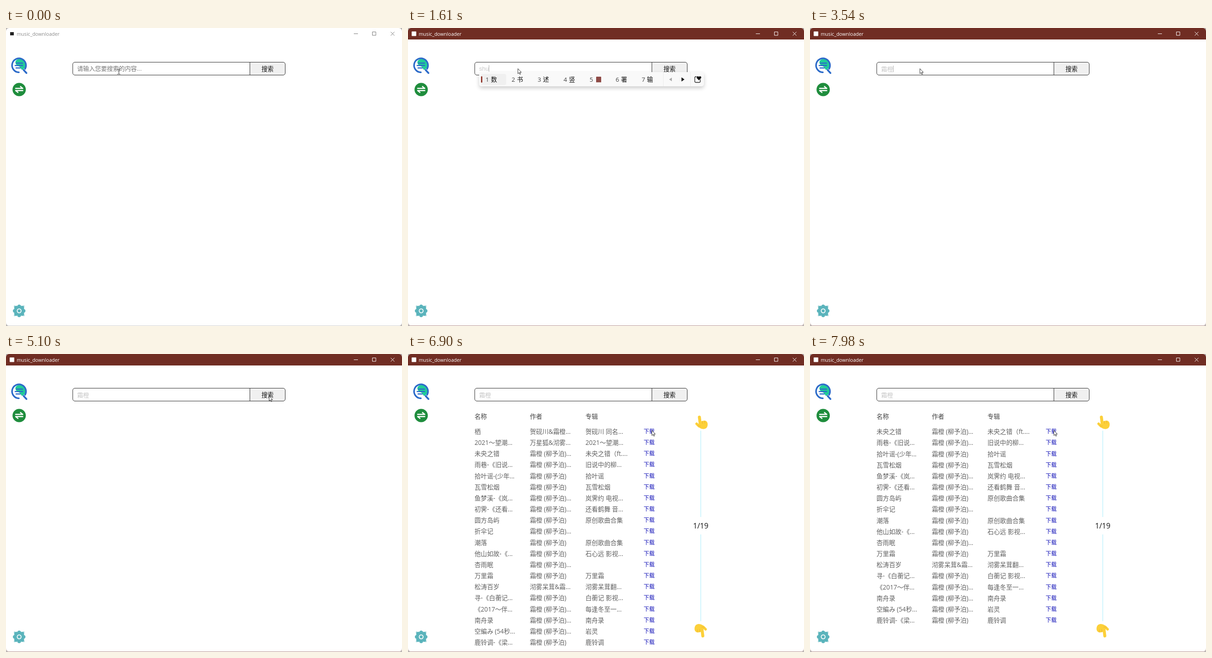
Animation of 863 by 649 pixels, one loop 8000 ms. Source, as an HTML page:

```html
<!DOCTYPE html>
<html lang="zh-CN">
<head>
<meta charset="utf-8">
<title>music_downloader</title>
<style>
html, body { margin: 0; width: 100%; height: 100%; overflow: hidden; background: #b8b4b3; }
body { font: 13.6px/20px "Open Sans", "Noto Sans CJK SC", "Noto Sans CJK", sans-serif; }
#win { position: absolute; left: 0; top: 0; width: 863px; height: 649px; overflow: hidden; background: #fff; border-radius: 7px; }
#win > *, #list > svg, .cell { position: absolute; white-space: pre; }
#bar { left: 0; top: 0; width: 863px; height: 25px; background: #702d23; }
#edge { inset: 0; border-radius: 7px; }
#name { left: 23.5px; top: 2.5px; font-size: 10.6px; }
#box { left: 145px; top: 74px; width: 462px; height: 27px; border: 1px solid #2c2c2c; border-radius: 5px; background: linear-gradient(90deg, #fff 385px, #2c2c2c 385px 386px, #f0f0f0 386px); }
#go { left: 532px; top: 79px; width: 76px; text-align: center; font-size: 13.2px; color: #111; }
#text { left: 155px; font: 13px/20px "Liberation Sans", "Noto Sans CJK SC", "Noto Sans CJK", sans-serif; }
#caret { display: inline-block; width: 1px; height: 14px; vertical-align: -2px; background: #aaa; }
#ime { left: 155px; top: 96px; height: 31px; display: flex; padding-left: 3px; border-radius: 5px; background: #f9f9f9; box-shadow: 0 4px 8px rgba(0,0,0,.2); font-size: 13.3px; color: #111; }
#ime div { position: relative; box-sizing: border-box; min-width: 54.7px; height: 24px; margin: 4px 1px 0; padding: 0 10px; line-height: 24px; border-radius: 4px; white-space: pre; }
#ime div:first-child { background: #f0f0f0; }
#ime div:first-child::before { content: ""; position: absolute; left: 0; top: 5px; width: 3px; height: 14px; border-radius: 2px; background: #943b30; }
#ime i { display: inline-block; width: 11.7px; font-style: normal; color: #444; }
#ime b { display: inline-block; width: 11px; height: 13px; margin-left: 3px; vertical-align: -2px; border-radius: 1px; background: #8e4a46; border-bottom: 1px solid #d8c8c4; box-sizing: border-box; }
#list { left: 0; top: 0; width: 863px; height: 649px; color: #606060; }
#list > svg { left: 0; top: 0; }
#clip { position: absolute; left: 0; top: 157px; width: 600px; height: 484px; overflow: hidden; }
#rows { position: absolute; left: 0; top: 0; }
#list .head { color: #444; }
#rows .get { font-size: 12px; color: #1414b8; }
#list .page { left: 598px; width: 80px; top: 364px; text-align: center; font-size: 16px; color: #111; }
svg { display: block; overflow: visible; }
</style>
</head>
<body>
<div id="win">
  <div id="bar"></div>
  <svg id="frame" width="863" height="25" fill="none">
    <rect id="logo" stroke="none"/>
    <path d="M758 12.5h9M798.5 8.5h7.5v7.5h-7.5zM838.5 8.5l8 8M846.5 8.5l-8 8"/>
  </svg>
  <div id="name">music_downloader</div>

  <svg id="side" width="60" height="649" fill="none" stroke-linecap="round">
    <path d="M21 72C25 66 36 66 41 73C45 80 42 88 36 91C32 91 33 86 29 84C23 82 19 77 21 72Z" fill="#20cc98"/>
    <g stroke="#2c6bc9">
      <path d="M28 96.5A15.2 15.2 0 1 1 41.5 89" stroke-width="3.5"/>
      <path d="M38.5 91.5l6 6.5" stroke-width="4"/>
      <path d="M23 76.5h13M20 81.8h16M22 87h9" stroke-width="2.6"/>
    </g>
    <circle cx="28.7" cy="134" r="14.5" fill="#1f8d3d"/>
    <path d="M21 131.5h15.5l-5-4M36.5 136.3H21l5 4" stroke="#fff" stroke-width="2.4" stroke-linejoin="round"/>
    <g id="gear" transform="translate(28.7 616)"></g>
  </svg>

  <div id="box"></div>
  <div id="go">搜索</div>
  <div id="text"><span id="typed"></span><span id="caret"></span></div>

  <div id="list">
    <div id="clip"><div id="rows"></div></div>
    <svg width="863" height="649">
      <path d="M638 167V355M638 393V582" stroke="#d2f6fd" stroke-width="2"/>
      <defs>
        <g id="hand" stroke-linecap="round" stroke-linejoin="round" fill="none">
          <path d="M-10.5 3l5 5" stroke="#fcd03a" stroke-width="5.5"/>
          <path d="M-4.5 -11.5l2 16" stroke="#fcd03a" stroke-width="6.5"/>
          <path d="M-4 -1Q2 -4 7 -4Q13 -3 13.5 3Q14 14 4 14.5Q-5 14 -8 7Z" fill="#fcd03a"/>
          <path d="M2 -2.5l.5 5M7 -3l.5 5M-8 6q3 3 6 2" stroke="#eeb42f" stroke-width="1"/>
        </g>
      </defs>
      <use href="#hand" transform="translate(639.5 149)"/>
      <use href="#hand" transform="translate(638 602.5) rotate(180)"/>
    </svg>
    <div class="cell page">1/19</div>
  </div>

  <div id="ime"></div>
  <svg id="beam" width="863" height="649" fill="none" stroke="#222">
    <path d="M243 89.5h2l1 1 1-1h2M246 90.5v9M243 100.5h2l1-1 1 1h2"/>
  </svg>
  <svg id="arrow" width="12" height="16">
    <path d="M.5.5V11.5L3 9.2 4.8 13 6.3 12.3 4.6 8.5H8Z" fill="#fff" stroke="#222" stroke-width=".9"/>
  </svg>
  <div id="edge"></div>
</div>

<script>
const LOOP = 8000, PITCH = 24.16;
const ui = {};
for (const el of document.querySelectorAll('[id]')) ui[el.id] = el;

const star = '霜橙', solo = star + ' (柳予泊)', more = solo + '...';
const songs = [
  ['栖', '贺砚川&霜橙...', '贺砚川 同名...'],
  ['2021～望潮...', '万星狐&沏雾...', '2021～望潮...'],
  ['未央之错', more, '未央之错（ft....'],
  ['雨巷-《旧说...', more, '旧说中的柳...'],
  ['拾叶谣-(少年...', solo, '拾叶谣'],
  ['瓦雪松烟', solo, '瓦雪松烟'],
  ['鱼梦溪-《岚...', more, '岚霁约 电视...'],
  ['初霁-《还看...', more, '还看鹤舞 音...'],
  ['圆方岛屿', solo, '原创歌曲合集'],
  ['折伞记', more, ''],
  ['潮落', solo, '原创歌曲合集'],
  ['他山如故-《...', solo, '石心远 影视...'],
  ['杏雨眠', more, ''],
  ['万里霜', solo, '万里霜'],
  ['松涛百岁', '沏雾呆茸&霜...', '沏雾呆茸翻...'],
  ['寻-《白蘅记...', solo, '白蘅记 影视...'],
  ['《2017～伴...', more, '每逢冬至一...'],
  ['南舟录', more, '南舟录'],
  ['空編み (54秒...', more, '岩灵'],
  ['鹿铃调-《梁...', solo, '鹿铃调']
];
const cols = [145, 265.5, 386.7, 513.5];

// [time, typed text, candidates, visible right edge]
const typing = [
  [0, '请输入您要搜索的内容...'],
  [1420, 's', '是 上 说 三 所 水 时'],
  [1520, 'sh', '是 上 说 时 手 啥 事'],
  [1610, 'shu', '数 书 述 竖 * 署 输'],
  [1750, 'shua', '刷 耍 唰 双 爽 霜 涮'],
  [1850, 'shuan', '双 爽 霜 栓 涮 拴 闩'],
  [1940, 'shuang', '双 爽 霜 孀 泷 骦 鹴'],
  [2130, "shuang'c", '双层 双重 双 爽 霜 孀 泷'],
  [2360, "shuang'ch", '双重 双唇 双 爽 霜 孀 泷'],
  [2460, "shuang'che", '双车 双侧 双 爽 霜 孀 泷'],
  [2650, "shuang'chen", '双晨 双辰 爽晨 爽尘 霜橙(chéng) 双 爽', 661],
  [2690, "shuang'chen", '双晨 双辰 爽晨 爽尘 霜橙(chéng) 双 爽'],
  [3070, "shuang'cheng", '霜橙 双城 双程票 爽城 双成对 双 爽'],
  [3540, star]
];
// [time, x, y] of the pointer tip
const path = [
  [0, 239, 88], [4250, 239, 88], [4420, 350, 96], [4600, 515, 99], [4770, 580, 96],
  [4960, 580, 96], [5100, 573, 91], [6470, 573, 91], [6650, 545, 130],
  [6780, 525, 160], [6900, 531, 166], [LOOP, 531, 166]
];
const carets = [[430, 940], [1420, 4110], [4620, 5060]];

const tools = `<svg width="90" height="31" fill="none">
  <path d="M1.5 0V31M60.5 0V31" stroke="#ececec"/>
  <path d="M20 12v8l-6-4z" fill="#aaa"/><path d="M41 11.5v9l6.5-4.5z" fill="#111"/>
  <rect x="70" y="10" width="12" height="12.5" rx="2.5" stroke="#222" stroke-width="1.3"/>
  <path d="M79 18.5l-5-5.2a2.9 2.9 0 0 1 5-3.3a2.9 2.9 0 0 1 5 3.3z" fill="#111" stroke="#f9f9f9"/></svg>`;

function cell(x, y, text, cls = '') {
  return `<span class="cell ${cls}" style="left:${x}px;top:${y}px">${text}</span>`;
}

function build() {
  ui.rows.innerHTML = songs.map((song, i) => [...song, '下载'].map((s, c) =>
    cell(cols[c], i * PITCH + 2, s.replace('&', '&amp;'), c == 3 ? 'get' : '')).join('')).join('');
  ui.list.insertAdjacentHTML('beforeend',
    ['名称', '作者', '专辑'].map((s, c) => cell(cols[c], 125.5, s, 'head')).join(''));
  let petals = '';
  for (let a = 0; a < 360; a += 45)
    petals += `<ellipse cy="-8.2" rx="4.6" ry="5.6" transform="rotate(${a})" fill="#5bb4bc"/>`;
  for (let a = 45; a < 360; a += 90)
    petals += `<path d="M-3 -14L-1.5 -15" transform="rotate(${a + 8})" stroke="#5bb4bc" stroke-width="1.2"/>`;
  ui.gear.innerHTML = petals + '<circle r="4.3" fill="#5bb4bc" stroke="#fff" stroke-width="1.7"/>';
}

const show = (el, on) => { el.style.visibility = on ? 'visible' : 'hidden'; };

let last;
function setText(step) {
  if (step === last) return;
  last = step;
  const [time, text, words, edge] = step;
  ui.typed.textContent = text;
  ui.text.style.color = time ? '#c6c6c6' : '#757575';
  ui.text.style.top = (text === star ? 79.5 : 78.5) + 'px';
  show(ui.ime, words);
  if (!words) return;
  ui.ime.innerHTML = words.split(' ').map((w, i) =>
    `<div><i>${i + 1}</i>${w === '*' ? '<b></b>' : w}</div>`).join('') + tools;
  const right = edge ? `${155 + ui.ime.offsetWidth - edge}px` : '-12px';
  ui.ime.style.clipPath = `inset(-3px ${right} -12px -8px)`;
}

function pointer(t) {
  const i = path.findIndex(p => p[0] > t);
  const [t0, x0, y0] = path[i - 1], [t1, x1, y1] = path[i];
  const k = (t - t0) / (t1 - t0);
  return [x0 + (x1 - x0) * k, y0 + (y1 - y0) * k];
}

function focusWindow(t) {
  const k = t < 380 ? 0 : t < 430 ? .5 : 1;
  ui.bar.style.opacity = k;
  ui.name.style.color = k ? '#fff' : '#8c8c8c';
  ui.frame.style.stroke = k ? '#fff' : '#777';
  const box = k ? { x: 8, y: 7.5, width: 10, height: 10, rx: 1, fill: '#fff' }
                : { x: 9, y: 9, width: 8, height: 7, rx: 0, fill: '#222' };
  for (const key in box) ui.logo.setAttribute(key, box[key]);
  ui.edge.style.boxShadow = `inset 0 -1px ${k ? '#b3918c' : '#d0d0d0'}`;
}

function draw(t) {
  focusWindow(t);
  setText(typing.findLast(s => s[0] <= t));
  // the caret of the empty field sits before the hint
  ui.caret.style.cssText = t < 1420 ? 'position:absolute;left:0;top:3px' : '';
  show(ui.caret, carets.some(([a, b]) => t >= a && t < b));
  show(ui.beam, t < 1420);
  show(ui.arrow, t >= 1420);
  const [x, y] = pointer(t);
  ui.arrow.style.transform = `translate(${x}px,${y}px)`;
  ui.list.style.opacity = t < 5760 ? 0 : Math.min(1, .4 + (t - 5760) / 250);
  const gone = t < 7420 ? 0 : t < 7940 ? 1 : 2;
  ui.rows.style.transform = `translateY(${-PITCH * gone}px)`;
}

build();
const start = performance.now();
function tick() {
  draw((performance.now() - start) % LOOP);
  requestAnimationFrame(tick);
}
tick();
</script>
</body>
</html>
```
